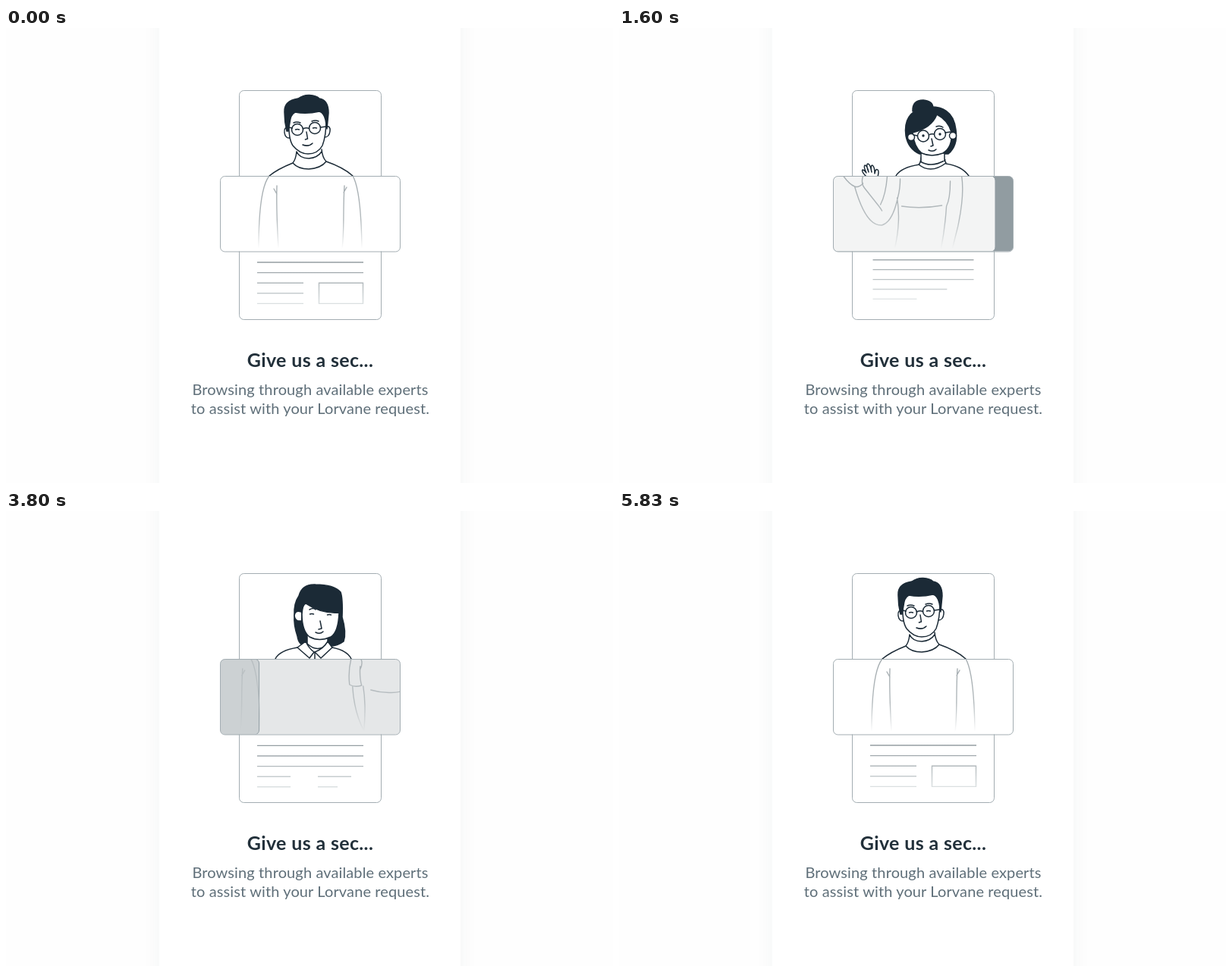
An HTML page for the animation above (5860 ms loop, 800x600 px).

```html
<!DOCTYPE html>
<html lang="en">
<head>
<meta charset="utf-8">
<title>Browsing experts</title>
<style>
  html, body { margin: 0; width: 100%; height: 100%; overflow: hidden; background: #fefefe; }
  svg { display: block; width: 800px; height: 600px; }
  .sheet { fill: #fff; filter: drop-shadow(0 0 11px rgba(30, 40, 50, .045)); }
  .frame { fill: none; stroke: #a3adb2; }
  .ink { fill: none; stroke: #1b2a36; stroke-width: 1.5; stroke-linecap: round; stroke-linejoin: round; }
  .ink .hair { fill: #1b2a36; }
  .ink .skin { fill: var(--card); }
  .ink .dot { fill: #1b2a36; stroke: none; }
  .cloth { fill: none; stroke: url(#fadeBody); stroke-width: 1.4; stroke-linecap: round; stroke-linejoin: round; }
  .rows { fill: none; stroke: url(#fadeRows); stroke-width: 1.4; }
  text { text-anchor: middle; font-family: Lato, Inter, sans-serif; }
  .title { font-size: 25px; font-weight: 700; letter-spacing: .35px; fill: #22303a; }
  .note { font-size: 20px; letter-spacing: .12px; fill: #5f6f79; }
</style>
</head>
<body>
<svg viewBox="0 0 800 600" xmlns="http://www.w3.org/2000/svg">
  <defs>
    <clipPath id="headClip"><path d="M307 195V88a6 6 0 0 1 6-6H489a6 6 0 0 1 6 6V195Z"/></clipPath>
    <clipPath id="bodyClip"><rect x="282.5" y="195.5" width="237" height="99" rx="6"/></clipPath>
    <clipPath id="rowClip"><rect x="307" y="295" width="188" height="90"/></clipPath>
    <linearGradient id="fadeBody" gradientUnits="userSpaceOnUse" x1="0" y1="195" x2="0" y2="291">
      <stop stop-color="#a3abaf"/><stop offset=".6" stop-color="#b2b9bc"/>
      <stop offset="1" stop-color="#b2b9bc" stop-opacity="0"/>
    </linearGradient>
    <linearGradient id="fadeRows" gradientUnits="userSpaceOnUse" x1="0" y1="306" x2="0" y2="367">
      <stop stop-color="#929b9f"/><stop offset=".35" stop-color="#a5adb1"/><stop offset="1" stop-color="#dfe4e5"/>
    </linearGradient>
  </defs>
  <rect class="sheet" x="202" y="-40" width="397" height="680"/>
  <g clip-path="url(#headClip)" id="head"></g>
  <g clip-path="url(#rowClip)" id="rows"></g>
  <rect class="frame" x="307.5" y="82.5" width="187" height="302" rx="6"/>
  <g clip-path="url(#bodyClip)" id="body"></g>
  <rect class="frame" x="282.5" y="195.5" width="237" height="99.5" rx="6"/>
  <text class="title" x="401" y="447">Give us a sec...</text>
  <text class="note" x="401" y="484">Browsing through available experts</text>
  <text class="note" x="401" y="509">to assist with your Lorvane request.</text>
</svg>
<script>
const LOOP = 5860;
const $ = id => document.getElementById(id);
const path = (d, cls = '') => `<path class="${cls}" d="${d}"/>`;
const ring = (x, y, r, cls = '') => `<circle class="${cls}" cx="${x}" cy="${y}" r="${r}"/>`;
const openEyes = (x1, y1, x2, y2) => ring(x1, y1, 1.7, 'dot') + ring(x2, y2, 1.7, 'dot');
const shutEyes = (x1, y1, x2, y2) => path(`M${x1 - 2.5} ${y1}q2.500 -1 5 0M${x2 - 2.5} ${y2}q2.500 -1 5 0`);
// parts that trail behind their figure while it enters
const trailing = (drag, art) => `<g data-drag="${drag}">${art}</g>`;
const HEAD_DRAG = 290, HAND_DRAG = -112;

const heads = [
  // round glasses, turtleneck
  path('M383 163Q382 173 378 178Q385 186 399 186Q415 185 422 176Q417 171 416 160M383 163Q387 172 399 172Q411 171 416 163M378 178Q358 186 347 195M422 176Q445 184 457 195') +
  trailing(HEAD_DRAG, `<g id="tilt">` +
    path('M373 131Q366 130 367 138Q368 146 375 145M422 130q6 -1 5 6q-1 8 -7 8') +
    path('M373 123Q372 146 378 155Q387 166 398 166Q411 166 417 155Q422 142 422 121', 'skin') +
    path('M370 136Q367 124 367 111Q366 96 385 93Q392 88 400 88.500Q409 89 413 93Q425 95 425 112L423 133L421 121Q419 112 413 110Q396 114 381 111Q375 114 374 125L372 136Z', 'hair') +
    ring(384, 134, 7.5) + ring(407, 132, 7.5) +
    path('M391.500 133q4 -2 8 -.5M373 131l4 1M414.500 131l7 -1M379 125q4 -2 9 0M403 123q5 -2 9 0M396 137l1.500 9l-3 1M391 154q8 3 13 -2') +
    `<g id="awake">${openEyes(384, 134, 407, 132)}</g><g id="blink">${shutEyes(384, 134, 407, 132)}</g></g>`),

  // hair bun, waving
  path('M397 176Q412 185 430 174M398 171Q398 177 395 180Q411 193 431 178Q428 173 428 170M396 180Q371 184 365 195M431 179Q452 182 461 195') +
  trailing(HEAD_DRAG,
    path('M387 110Q386 95 401 95Q414 96 414 106Z', 'hair') +
    path('M378 142Q374 112 401 105Q440 99 444 134Q447 155 434 166L396 166Q381 159 378 142Z', 'hair') +
    path('M398 176V165H429V175', 'skin') +
    path('M387 138Q412 132 419 114Q434 122 438 137Q440 157 427 165Q412 171 399 165Q389 157 387 138Z', 'skin') +
    ring(385, 144, 4.5, 'skin') + ring(440, 142, 4.5, 'skin') + ring(401, 142.5, 7.5) + ring(423, 140, 7.5) +
    path('M408.500 141q3 -2 7 -1M388 141l5 1M430 138l7 -1M418 130q5 -2 9 1M412 146l2 9l-3 1M408 161q6 3 10 -1') +
    openEyes(401, 142, 423, 140)) +
  trailing(HAND_DRAG, path('M326 196Q319 189 321 187Q323 187 326 191Q322 183 324 181Q327 181 329 190Q325 180 328 179Q331 179 333 190Q331 181 334 181Q337 183 337 192Q338 185 341 187Q343 189 341 196')),

  // square glasses, collar
  `<g transform="translate(30)">` +
  path('M352 167L353 174L350 186L362 189L366 179L372 187L393 176L386 167L385 163M353 174Q362 183 366 179Q380 177 386 167M364 180l4 0l3 7M349 179Q328 188 313 195M393 175L422 181Q428 188 430 195') +
  trailing(HEAD_DRAG,
    path('M331 138q-4 5 0 12q3 4 6 0M383 125q6 -4 8 3q0 8 -8 10') +
    path('M328 134Q335 159 343 164Q358 171 371 163Q383 152 382 123', 'skin') +
    path('M325 131Q317 103 333 99Q355 97 365 89Q380 85 383 97Q385 115 382 130L379 129Q379 118 372 112Q350 121 334 117Q328 122 330 137Z', 'hair') +
    path('M333 136L349 133L348 145Q338 149 335 146ZM355 131L373 126Q375 134 371 138L357 140ZM349 136l7 -2M373 129l9 -3M334 130q5 -5 9 -2M356 125q6 -4 10 -2M353 139l3 9l-4 2M356 156Q362 157 365 151') +
    openEyes(341, 140, 364, 133)) + `</g>`,

  // long hair, collar; looks to one side, then to the other
  trailing(HEAD_DRAG, `<g id="lookRight">` +
    path('M386 112Q390 96 408 97Q432 97 441 107Q444 115 443 140Q449 160 445 172Q436 179 424 178L396 176Q386 179 384 165Q379 150 380 138Q379 122 386 112Z', 'hair') +
    path('M397 163V175Q411 188 424 175V163', 'skin') +
    path('M390 136Q391 123 395 122Q416 136 439 134Q438 160 428 166Q413 173 400 166Q390 158 390 136Z', 'skin') +
    path('M389 133Q381 130 380 138Q381 146 389 145', 'skin') +
    path('M400 130q5 -3 8 0M424 131q4 -2 8 1M414 145l2 10l-4 1M408 160q6 3 10 -1') +
    shutEyes(403, 136, 426, 137) + `</g><g id="lookLeft">` +
    path('M378 150Q373 96 400 94Q431 92 437 107Q440 116 437 126Q441 150 440 166Q434 174 423 173H394Q384 176 380 168Z', 'hair') +
    path('M395 161V175Q409 188 422 175V161', 'skin') +
    path('M386 117Q402 125 431 125Q433 148 422 160Q408 171 396 162Q386 153 386 117Z', 'skin') +
    path('M431 133Q437 130 437 137Q436 145 431 145', 'skin') +
    path('M391 128q4 -3 9 -1M414 127q5 -2 9 1M407 139l1 10l-4 1M402 154q5 2 10 -1') +
    openEyes(396, 133.5, 419, 133.5) + `</g>`) +
  path('M395 172L384 180L400 194L406 186Q399 181 395 172M424 172L430 180L415 194L407 186Q418 182 424 172', 'skin') +
  path('M384 180Q360 184 355 195M430 180Q450 184 455 195M407 186v9')
];

const longSleeves = path('M347 195Q333 212 333 290M457 195Q468 214 469 290M357 208C356 240 358 270 359 290M353 212L357 219M446 208C444 240 446 270 443 290M449 210L445 217');
const halfSleeve = path('M351 195Q347 212 349 229Q356 233 365 230M363 205Q362 220 365 230M364 195Q367 201 363 209M353 232Q355 265 368 290M367 231Q371 255 368 290');
const bodies = [
  longSleeves,
  path('M316 195Q324 206 331 209Q346 262 367 260Q381 256 388 223Q391 212 391 199M342 195Q339 205 344 211L363 235Q366 239 367 241M331 209Q336 211 342 205M374 195Q372 220 365 233M387 224Q392 255 384 290M393 235Q418 239 446 234M457 202Q457 225 452 235Q450 265 445 290M472 195Q476 220 467 262L460 290'),
  longSleeves,
  halfSleeve + `<g transform="matrix(-1 0 0 1 802 0)">${halfSleeve}</g>` + path('M377 236Q401 243 425 236')
];

// each row lists x, length pairs
const layout = (rows, top = 309) => path(rows.map((row, i) => {
  let d = '';
  for (let k = 0; k < row.length; k += 2) d += `M${row[k]} ${top + 13.6 * i}h${row[k + 1]}`;
  return d;
}).join(''));
const L = 331, R = 411, FULL = [L, 140], HALF = [L, 61], PAIR = [L, 60, R, 60], SHORT = [L, 44, R, 44];
const paragraph = layout([FULL, FULL, FULL, [L, 103], HALF], 309.6);
const sheets = [
  { art: layout([FULL, FULL, HALF, HALF, HALF]) + path('M412.500 336.200h58v27.200h-58Z'), in: 4950, out: 950 },
  { art: paragraph, in: 1050, out: 1450 },
  { art: paragraph, in: 1800, out: 2295, ox: 135, oy: 340 },
  { art: layout([FULL, FULL, FULL, SHORT, [L, 44, R, 26]], 309.4), in: 2600, out: 4130 },
  { art: layout([PAIR, PAIR, PAIR, SHORT, [L, 26, R, 26]], 309.6), in: 4170, out: 4850 }
];

const clamp = v => Math.max(0, Math.min(1, v));
const ease = u => u < .5 ? 4 * u ** 3 : 1 - 4 * (1 - u) ** 3;
const shade = k => `rgb(${[122, 110, 105].map(v => Math.round(255 - v * k))})`;
const show = (node, on) => { node.style.display = on ? '' : 'none'; };

function makePanel(id, [x, y, w, h], cls, figures, moves, lagOut, lagIn) {
  const host = $(id);
  host.innerHTML = `<rect x="${x}" y="${y}" width="${w}" height="${h}"/>` +
    `<rect x="${x}" y="${y}" width="${w}" height="${h}" rx="6" stroke="#929ea4"/>` +
    figures.map(art => `<g class="${cls}">${art}</g>`).join('');
  const [under, over, ...arts] = host.children;
  return t => {
    let from = 0, p = 0;
    moves.forEach(([start, length], i) => {
      if (t >= start) { from = i; p = ease(clamp((t - start) / length)); }
    });
    const to = (from + 1) % arts.length;
    const late = lag => p - lag * p * p * (1 - p);
    const outShade = shade(Math.min(p, 1.2 - p)), inShade = shade(1 - p);
    under.setAttribute('fill', p ? inShade : '#fff');
    over.setAttribute('fill', outShade);
    over.setAttribute('transform', `translate(${-w * p})`);
    show(over, p > 0 && p < 1);
    arts.forEach((g, i) => {
      const leaving = i === from;
      show(g, leaving ? p < 1 : i === to && p > 0);
      g.setAttribute('transform', `translate(${w * (leaving ? -late(lagOut) : 1 - late(lagIn))})`);
      g.setAttribute('opacity', 1 - .6 * (leaving ? p : 1 - p));
      g.style.setProperty('--card', leaving ? outShade : inShade);
      g.querySelectorAll('[data-drag]').forEach(part => {
        const pull = leaving ? 0 : part.dataset.drag * p * (1 - p) ** 2;
        part.setAttribute('transform', `translate(${pull})`);
      });
    });
  };
}

const drawHead = makePanel('head', [307, 82, 188, 113], 'ink', heads,
  [[600, 600], [1630, 540], [2195, 600], [4275, 600]], 0, .6);
const drawBody = makePanel('body', [282, 195, 238, 100], 'cloth', bodies,
  [[150, 600], [1425, 600], [3428, 600], [4750, 850]], 1.65, 1.65);

$('rows').innerHTML = sheets.map(s => `<g class="rows">${s.art}</g>`).join('');
const sheetNodes = [...$('rows').children];

function drawRows(t) {
  sheets.forEach(({ in: start, out, ox = 401, oy = 233 }, i) => {
    const since = (t - start + LOOP) % LOOP, stay = (out - start + LOOP) % LOOP;
    const a = 1 - (1 - clamp(since / 350)) ** 3;
    const q = clamp((since - stay) / 300);
    const scale = 1 + .05 * (1 - a) - .1 * q;
    sheetNodes[i].setAttribute('transform', `translate(${ox} ${oy}) scale(${scale}) translate(${-ox} ${-oy})`);
    sheetNodes[i].setAttribute('opacity', a * (1 - q ** 3));
  });
}

function drawFaces(t) {
  const lean = t < 1300 ? 3.5 * ease(clamp((t - 150) / 700)) : 0;
  const settle = clamp((t - 5500) / 300) * clamp((LOOP - t) / 30);
  $('tilt').setAttribute('transform', `translate(${settle}) rotate(${lean} 399 172)`);
  const shut = t < 260 || t > 5700;
  show($('awake'), !shut);
  show($('blink'), shut);
  show($('lookRight'), t < 4020);
  show($('lookLeft'), t >= 4020);
}

const begin = performance.now();
function draw() {
  const t = (performance.now() - begin) % LOOP;
  drawHead(t);
  drawBody(t);
  drawRows(t);
  drawFaces(t);
  requestAnimationFrame(draw);
}
draw();
</script>
</body>
</html>
```
